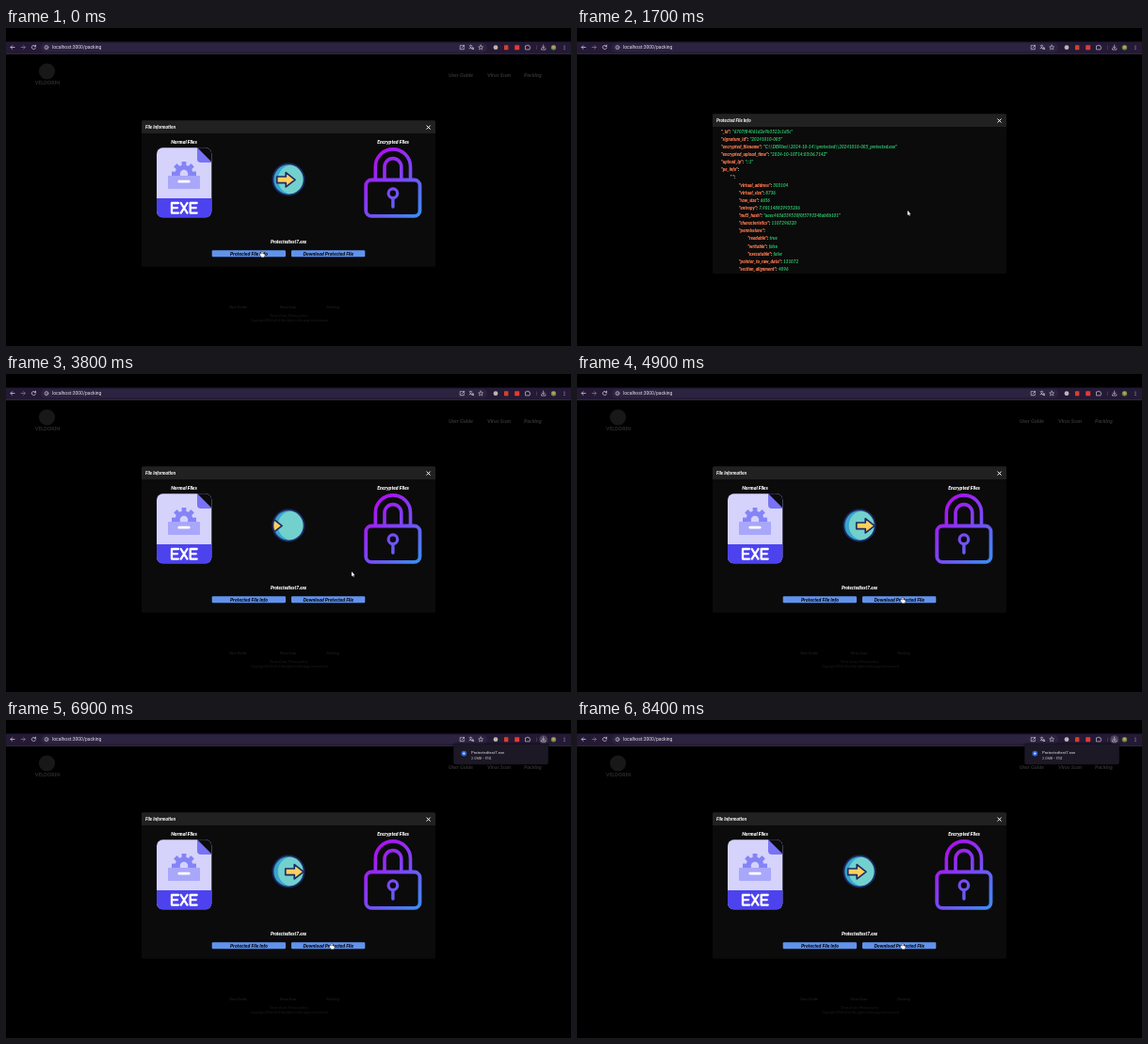
Animation, 600 px wide and 338 px high, one loop 8500 ms. Source, as an HTML page with a canvas:

```html
<!DOCTYPE html>
<html lang="en">
<head>
<meta charset="utf-8">
<title>File protection demo</title>
<style>
html, body { margin: 0; width: 100%; height: 100%; overflow: hidden; background: #000; }
canvas { display: block; width: 100vw; height: 100vh; }
</style>
</head>
<body>
<canvas id="stage"></canvas>
<script>
const W = 600, H = 338, LOOP = 8500;
const OPEN_INFO = 500, CLOSE_INFO = 2700, START_LOAD = 5600, SHOW_POPUP = 6500;
const NAVY = '#1d2b66';
const canvas = document.getElementById('stage');
const c = canvas.getContext('2d');

const DISPLAY = 'Lato, sans-serif';
const UI = 'Roboto, "Noto Sans CJK KR", "Noto Sans CJK", sans-serif';

function text(s, x, y, size, color, align = 'left', font = `italic 900 ${size}px ${DISPLAY}`) {
  c.font = font;
  c.fillStyle = color;
  c.textAlign = align;
  c.textBaseline = 'alphabetic';
  c.fillText(s, x, y);
  return c.measureText(s).width;
}

function box(x, y, w, h, color, r = 0) {
  c.fillStyle = color;
  c.beginPath();
  c.roundRect(x, y, w, h, r);
  c.fill();
}

function disc(x, y, r, color) {
  c.fillStyle = color;
  c.beginPath();
  c.arc(x, y, r, 0, 7);
  c.fill();
}

function ring(x, y, r, color, width) {
  c.strokeStyle = color;
  c.lineWidth = width;
  c.beginPath();
  c.arc(x, y, r, 0, 7);
  c.stroke();
}

function stroke(path, color, width) {
  c.strokeStyle = color;
  c.lineWidth = width;
  c.lineCap = c.lineJoin = 'round';
  c.stroke(new Path2D(path));
}

function fill(path, color) {
  c.fillStyle = color;
  c.fill(new Path2D(path));
}

function browserBar(t) {
  const ink = '#c9c4d2';
  box(0, 14.5, W, 13, '#251a35');
  box(0, 27, W, 0.7, '#3a3145');
  box(37, 16, 474, 9.4, '#2c2340', 4.7);
  stroke('M9 20.5H5M6.7 18.7L4.9 20.5L6.7 22.3', ink, 0.8);
  stroke('M16.2 20.5H20.2M18.5 18.7L20.3 20.5L18.5 22.3', '#827a8d', 0.8);
  stroke('M31.2 19.3A2.1 2.1 0 1 0 31.5 21M31.5 18.2V19.6H30', ink, 0.8);
  ring(43, 20.6, 2, ink, 0.7);
  stroke('M43 20.4V21.6M43 19.5V19.5', ink, 0.6);
  text('localhost:3000/packing', 49, 22.3, 5, '#e3dfe8', 'left', `400 5px ${UI}`);

  stroke('M484 18.6H482.2V22.7H486.3V21M485 18.4H486.6V20M486.4 18.6L484 21', ink, 0.7);
  text('文', 491.6, 21.8, 4, ink, 'left', `700 4px ${UI}`);
  text('A', 494.4, 23, 4, ink, 'left', `700 4px ${UI}`);
  stroke('M504.2 18.1L504.9 19.8L506.7 19.9L505.3 21.1L505.8 22.9L504.2 21.9L502.6 22.9L503.1 21.1L501.7 19.9L503.5 19.8Z', ink, 0.6);
  disc(520, 20.7, 2.4, '#bbb6b4');
  box(529, 18.2, 4.4, 5, '#d4402f', 0.5);
  box(540.2, 18.2, 5, 5, '#e33b35', 0.6);
  stroke('M551.9 18.9H553.2A.8 .8 0 0 1 554.8 18.9H556V20.2A.8 .8 0 0 1 556 21.8V22.9H551.9Z', ink, 0.7);
  box(563.1, 18.4, 0.6, 4.5, '#574a65');
  downloadIcon(t, ink);
  disc(581.5, 20.7, 2.7, '#67904a');
  disc(581.5, 20.3, 1.4, '#d29a62');
  for (let i = -1; i < 2; i++) disc(593, 20.7 + i * 1.7, 0.5, ink);
}

function downloadIcon(t, ink) {
  const loading = t >= START_LOAD && t < SHOW_POPUP;
  if (t >= SHOW_POPUP) disc(570.7, 20.7, 4.5, '#4b405a');
  if (loading) {
    ring(570.7, 20.7, 3.2, '#d7d7f0', 0.8);
    stroke('M570.7 19V22M569.5 21L570.7 22.2L571.9 21', '#d7d7f0', 0.7);
  } else {
    stroke('M570.7 18V21.3M569.2 20L570.7 21.5L572.2 20M568.5 21.8V23H572.9V21.8', ink, 0.7);
  }
}

function page() {
  disc(43.5, 46, 8.6, '#181818');
  text('VELDORIN', 44, 60.3, 5.2, '#262626', 'center', `900 5.2px ${DISPLAY}`);
  text('User Guide', 483, 51.6, 5.6, '#2b2b2b', 'center');
  text('Virus Scan', 523.5, 51.6, 5.6, '#2b2b2b', 'center');
  text('Packing', 559.5, 51.6, 5.6, '#2b2b2b', 'center');
  const faint = '#191919';
  text('User Guide', 246.5, 297.5, 4, faint, 'center');
  text('Virus Scan', 299.5, 297.5, 4, faint, 'center');
  text('Packing', 347, 297.5, 4, faint, 'center');
  text('Terms of use | Privacy policy', 300, 307, 3.4, '#141414', 'center');
  text('Copyright 2024 all of the rights to this page are reserved', 301, 312, 3.4, '#141414', 'center');
}

function panel(y, h, title) {
  box(144, y, 312, h, '#0b0b0b', 1.5);
  box(144, y, 312, 13.7, '#212121', [1.5, 1.5, 0, 0]);
  text(title, 148, y + 8.9, 4.7, '#e6e6e6');
  stroke(`M446.9 ${y + 5.6}l3.4 3.4m0 -3.4l-3.4 3.4`, '#fff', 1);
}

function exeIcon() {
  c.save();
  c.beginPath();
  c.roundRect(160, 127.3, 58.3, 74, 6.5);
  c.clip();
  box(160, 127, 59, 75, '#d5d3fc');
  fill('M203 127H219V143H207Q203 143 203 139Z', '#7873f5');
  fill('M203 127H219V143Z', '#0b0b0b');
  box(160, 181, 59, 21, '#4d43ee');
  c.restore();

  c.save();
  c.beginPath();
  c.rect(172, 138, 34, 19.5);
  c.clip();
  c.translate(189, 155);
  c.fillStyle = '#8584f6';
  for (let i = 0; i < 8; i++) {
    c.rotate(Math.PI / 4);
    c.fillRect(-2.4, -13, 4.8, 6);
  }
  disc(0, 0, 9.6, '#8584f6');
  disc(0, 0, 4.3, '#d5d3fc');
  c.restore();
  box(172, 157, 34, 14, '#a9a7fa', 1);
  box(182.5, 161.8, 13, 2.6, '#fff', 1.2);
  // block capitals
  const E = x => `M${x + 7} 186H${x}V196.6H${x + 7}M${x} 191.2H${x + 6}`;
  stroke(E(176) + 'M185.7 186L192.5 196.6M192.5 186L185.7 196.6' + E(195.7), '#fff', 2.3);
}

function arrowShift(t) {
  const p = t % 2000;
  if (p < 600) return 0;
  if (p < 1300) return 30 * ((p - 600) / 700) ** 1.42;
  if (p < 1600) return -28;
  return -28 * (1 - (p - 1600) / 400);
}

function arrowIcon(t) {
  c.save();
  c.beginPath();
  c.arc(300, 161, 16.6, 0, 7);
  c.clip();
  disc(300, 161, 17, '#37a5ce');
  disc(304.5, 161, 15.8, '#72d0cd');
  c.translate(arrowShift(t), 0);
  const arrow = 'M287.7 158H297.2V153.7L307 161.3L297.2 168.9V164.6H287.7Z';
  fill(arrow, '#ffd05b');
  stroke(arrow, NAVY, 1.7);
  c.restore();
  ring(300, 161, 16.6, NAVY, 1.8);
}

function lockIcon() {
  const g = c.createLinearGradient(386, 140, 442, 196);
  g.addColorStop(0, '#b10cf0');
  g.addColorStop(0.45, '#7e43f5');
  g.addColorStop(1, '#3c8df4');
  c.strokeStyle = g;
  c.lineWidth = 3.8;
  c.beginPath();
  c.roundRect(382.2, 161.5, 57.3, 38.4, 6);
  c.stroke();
  stroke('M392.3 160V147.5A18.6 18.6 0 0 1 429.5 147.5V160M402 160V147.5A8.9 8.9 0 0 1 419.8 147.5V160', g, 3.6);
  ring(410.9, 175.7, 4.8, g, 3.2);
  stroke('M410.9 181V190', g, 3.4);
}

function filePanel(t) {
  panel(98.3, 155.5, 'File Information');
  text('Normal Files', 189, 122.8, 5.2, '#fff', 'center');
  text('Encrypted Files', 411, 122.8, 5.2, '#fff', 'center');
  exeIcon();
  arrowIcon(t);
  lockIcon();
  text('Protectedtest7.exe', 300, 229.3, 4.7, '#fff', 'center');
  box(218.7, 236.3, 78.3, 7, '#6193ec', 1.2);
  box(303, 236.3, 78.3, 7, '#6193ec', 1.2);
  text('Protected File Info', 258, 241.7, 5.1, '#0b0d18', 'center');
  text('Download Protected File', 342.2, 241.7, 5.1, '#0b0d18', 'center');
}

// indent level, key, value
const INFO = [
  [0, '_id', '"6707f84061d2e9b3522c1d5c"'],
  [0, 'signature_id', '"20241010-005"'],
  [0, 'encrypted_filename', '"C:\\\\DBFiles\\\\2024-10-14\\\\protected\\\\20241010-005_protected.exe"'],
  [0, 'encrypted_upload_time', '"2024-10-10T14:03:06.714Z"'],
  [0, 'upload_ip', '"::1"'],
  [0, 'pe_info', ''],
  [1, ' ', ''],
  [2, 'virtual_address', '303104'],
  [2, 'virtual_size', '8736'],
  [2, 'raw_size', '6656'],
  [2, 'entropy', '7.901148829935206'],
  [2, 'md5_hash', '"aaec465d339530f0f5793348ab0b101"'],
  [2, 'characteristics', '1107296320'],
  [2, 'permissions', ''],
  [3, 'readable', 'true'],
  [3, 'writable', 'false'],
  [3, 'executable', 'false'],
  [2, 'pointer_to_raw_data', '131072'],
  [2, 'section_alignment', '4096']
];

function infoPanel() {
  panel(91.2, 170, 'Protected File Info');
  INFO.forEach(([level, key, value], i) => {
    const x = 153 + level * 9.4, y = 111.6 + i * 8.13;
    const w = text(`"${key}"`, x, y, 4.6, '#ff7a50');
    text(': ', x + w, y, 4.6, '#d8d8d8');
    text(value, x + w + 2.6, y, 4.6, '#27ae60');
  });
}

function popup() {
  c.save();
  c.shadowColor = '#000';
  c.shadowBlur = 3;
  box(475.3, 25.8, 100.5, 21.5, '#1c1825', 2.5);
  c.restore();
  disc(486.3, 35.6, 2.9, '#2d64d8');
  disc(486.3, 35.6, 1.1, '#dfe8ff');
  text('Protectedtest7.exe', 494, 36, 4.2, '#e6e3ea', 'left', `400 4.2px ${UI}`);
  text('2.0MB • 완료', 494, 41.6, 3.9, '#b9b4c0', 'left', `400 3.9px ${UI}`);
}

// time, x, y
const PATH = [
  [0, 272, 238], [600, 272, 238], [1300, 351, 194], [1900, 351, 194],
  [2500, 448, 98], [2900, 448, 98], [3800, 367, 210], [4300, 346, 238], [LOOP, 346, 238]
];

function cursorAt(t) {
  const i = PATH.findIndex(p => p[0] > t);
  const [t0, x0, y0] = PATH[i - 1], [t1, x1, y1] = PATH[i];
  const u = (t - t0) / (t1 - t0), e = u * u * (3 - 2 * u);
  return [x0 + (x1 - x0) * e, y0 + (y1 - y0) * e];
}

function cursor(t) {
  const [x, y] = cursorAt(t);
  const hand = y > 235 && (t < OPEN_INFO || t > CLOSE_INFO);
  const shape = hand
    ? 'M-.6 0Q0-.7 .6 0V2.1L2.5 2.6Q3 2.8 2.8 3.6L2.2 5.4H-.7L-2.2 3.3Q-2-.1 -.6 2.8Z'
    : 'M0 0V5L1.2 4L2 5.8L2.8 5.4L2 3.7H3.5Z';
  c.save();
  c.translate(x, y);
  stroke(shape, '#111', 0.7);
  fill(shape, '#fff');
  c.restore();
}

function draw(t) {
  const w = Math.round(innerWidth * devicePixelRatio);
  const h = Math.round(innerHeight * devicePixelRatio);
  if (canvas.width !== w || canvas.height !== h) {
    canvas.width = w;
    canvas.height = h;
  }
  c.setTransform(w / W, 0, 0, h / H, 0, 0);
  box(0, 0, W, H, '#000');
  browserBar(t);
  if (t >= OPEN_INFO && t < CLOSE_INFO) {
    infoPanel();
  } else {
    page();
    filePanel(t);
  }
  if (t >= SHOW_POPUP) popup();
  cursor(t);
}

const start = performance.now();
function tick() {
  draw((performance.now() - start) % LOOP);
  requestAnimationFrame(tick);
}
tick();
</script>
</body>
</html>
```
